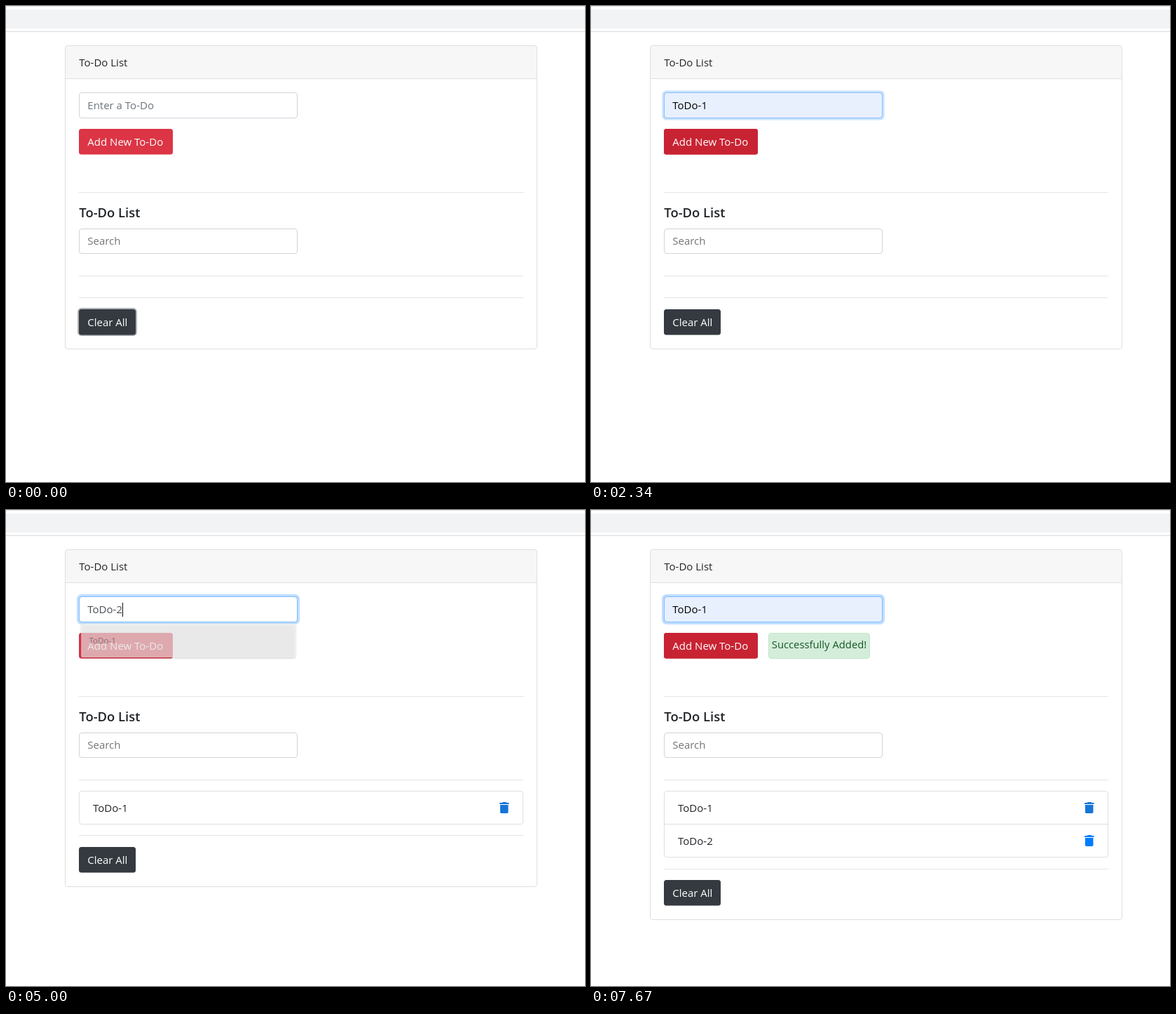
These frames come from a looping animation (826 by 678 pixels, 8000 ms). An HTML page with a canvas:

```html
<!DOCTYPE html>
<html lang="en">
<head>
<meta charset="utf-8">
<title>To-Do List</title>
<style>
  html, body { margin: 0; width: 100%; height: 100%; overflow: hidden; background: #fff; }
  canvas { display: block; }
</style>
</head>
<body>
<canvas id="stage" width="826" height="678"></canvas>
<script>
const ctx = document.getElementById('stage').getContext('2d', { alpha: false });
const LOOP = 8000, FADE = 140;
const FONT = '"Open Sans", "Noto Sans", sans-serif';
let now = 0;

// Time helpers
const ramp = start => {
  const x = Math.min(1, Math.max(0, (now - start) / FADE));
  return x * x * (3 - 2 * x);
};
const pulse = (start, end) => ramp(start) - ramp(end);
const during = (start, end) => now >= start && now < end;
const latest = steps => steps.filter(([start]) => now >= start).pop()[1];

const VALUES = [[0, ''], [1210, 'ToDo-1'], [2400, ''], [3490, 'ToDo-1'],
  [4730, 'ToDo-'], [4940, 'ToDo-2'], [6020, ''], [6790, 'ToDo-1']];
const ITEM_COUNT = [[0, 0], [2400, 1], [6020, 2]];
// start, end, x
const CARETS = [[870, 1390, 116], [1780, 2310, 166], [3130, 3670, 116], [3670, 4300, 166],
  [4730, 4940, 158], [4940, 5440, 166], [6430, 6950, 116], [6970, 7590, 166]];

// Drawing helpers
function rect(x, y, w, h, color) {
  ctx.fillStyle = color;
  ctx.fillRect(x, y, w, h);
}

function box(x, y, w, h, fill, border, radius = 3.5) {
  ctx.beginPath();
  ctx.roundRect(x, y, w, h, radius);
  if (fill) { ctx.fillStyle = fill; ctx.fill(); }
  if (border) { ctx.strokeStyle = border; ctx.lineWidth = 1; ctx.stroke(); }
}

function text(str, x, y, color, size = 15, weight = 400) {
  ctx.font = `${weight} ${size}px ${FONT}`;
  ctx.fillStyle = color;
  ctx.fillText(str, x, y);
}

function faded(alpha, paint) {
  if (alpha <= 0) return;
  ctx.save();
  ctx.globalAlpha = alpha;
  paint();
  ctx.restore();
}

function ring(x, y, w, h, amount, color) {
  const s = 3 * amount;
  faded(amount, () => box(x - s, y - s, w + 2 * s, h + 2 * s, color, null, 3.5 + s));
}

const rule = y => rect(104, y, 634, 1, '#e5e5e5');

function trash(y, color) {
  box(708, y, 6, 2, color, null, 1);
  box(704, y + 1, 13.5, 2, color, null, 0.5);
  box(705, y + 4, 11.5, 12, color, null, [0, 0, 1.8, 1.8]);
}

function entryField() {
  const focus = pulse(870, 2310) + pulse(3130, 5890) + ramp(6430);
  const value = latest(VALUES);
  const autofilled = value === 'ToDo-1';
  ring(104, 123, 312, 37, focus, '#bfdeff');
  box(104.5, 123.5, 311, 36, autofilled ? '#e8f0fe' : '#fff', '#ced4da');
  faded(focus, () => box(104.5, 123.5, 311, 36, null, '#80bdff'));
  text(value || 'Enter a To-Do', 116.3, 147, autofilled ? '#000' : value ? '#495057' : '#6c757d');
  const caret = CARETS.find(([start, end]) => during(start, end));
  if (caret) rect(caret[2], 132, 1, 20, '#111');
}

function addButton() {
  const hover = pulse(1930, 2620) + (during(3820, 4120) ? ramp(3820) : 0) +
    pulse(5690, 6190) + pulse(7120, 7190) + ramp(7530);
  ring(104, 175, 134, 36.5, pulse(2310, 3130) + pulse(5890, 6430), '#ed9aa2');
  box(104, 175, 134, 36.5, '#dc3545');
  faded(hover, () => box(104, 175, 134, 36.5, '#c82333'));
  text('Add New To-Do', 116.3, 199, '#fff');
}

function suggestions() {
  const shown = pulse(870, 1790) + pulse(3150, 3680) + pulse(4730, 4940) + pulse(6450, 6980);
  const active = during(1210, 2000) || during(3490, 3900) || during(6790, 7200);
  faded(shown, () => {
    const scale = 0.95 + 0.05 * shown;
    ctx.translate(260, 186);
    ctx.scale(scale, scale);
    ctx.translate(-260, -186);
    ctx.shadowColor = 'rgba(0,0,0,.35)';
    ctx.shadowBlur = 3;
    ctx.shadowOffsetY = 1;
    box(104, 161.5, 312, 49, '#fff', null, 2);
    ctx.shadowColor = 'transparent';
    if (active) rect(104, 168, 312, 35, '#e8e8e8');
    text('ToDo-1', 115.5, 190, '#444', 11.9);
  });
}

function draw() {
  const count = latest(ITEM_COUNT);
  const shift = [0, 48, 95][count];

  rect(0, 0, 826, 678, '#fff');
  rect(0, 0, 826, 1, '#e4e5e7');
  rect(0, 5, 826, 27, '#f1f3f4');
  rect(0, 36, 826, 1, '#dadce0');

  box(84.5, 56.5, 673, 47, '#f7f7f7', null, [3.5, 3.5, 0, 0]);
  rect(85, 103, 672, 1, '#dfdfdf');
  box(84.5, 56.5, 673, 432 + shift, null, '#dfdfdf');
  text('To-Do List', 104.3, 86, '#212529');

  entryField();
  addButton();
  if (during(2400, 4410) || now >= 6020) {
    box(253.5, 175.5, 144, 36, '#d4edda', '#c3e6cb');
    text('Successfully Added!', 257.8, 197, '#155724', 14.8);
  }

  rule(265);
  text('To-Do List', 104.3, 301, '#212529', 18.4, 600);
  box(104.5, 317.5, 311, 35, '#fff', '#ced4da');
  text('Search', 116.3, 340, '#757575');
  rule(384);

  if (count) box(104.5, 400.5, 633, 47 * count, '#fff', '#dfdfdf');
  for (let i = 0; i < count; i++) {
    const y = 400 + 47 * i;
    if (i) rect(105, y, 632, 1, '#dfdfdf');
    text('ToDo-' + (i + 1), 124, y + 30, '#212529');
    trash(y + 16, i ? '#007bff' : '#1675d6');
  }

  rule(415 + shift + (count > 1));
  ring(104, 432, 81, 36, Math.max(0, (40 - now) / 60), '#85898c');
  box(104, 432 + shift, 81, 36.5, '#343a40');
  text('Clear All', 116.3, 456 + shift, '#fff');

  suggestions();
}

function frame() {
  now = performance.now() % LOOP;
  draw();
  requestAnimationFrame(frame);
}
frame();
</script>
</body>
</html>
```
